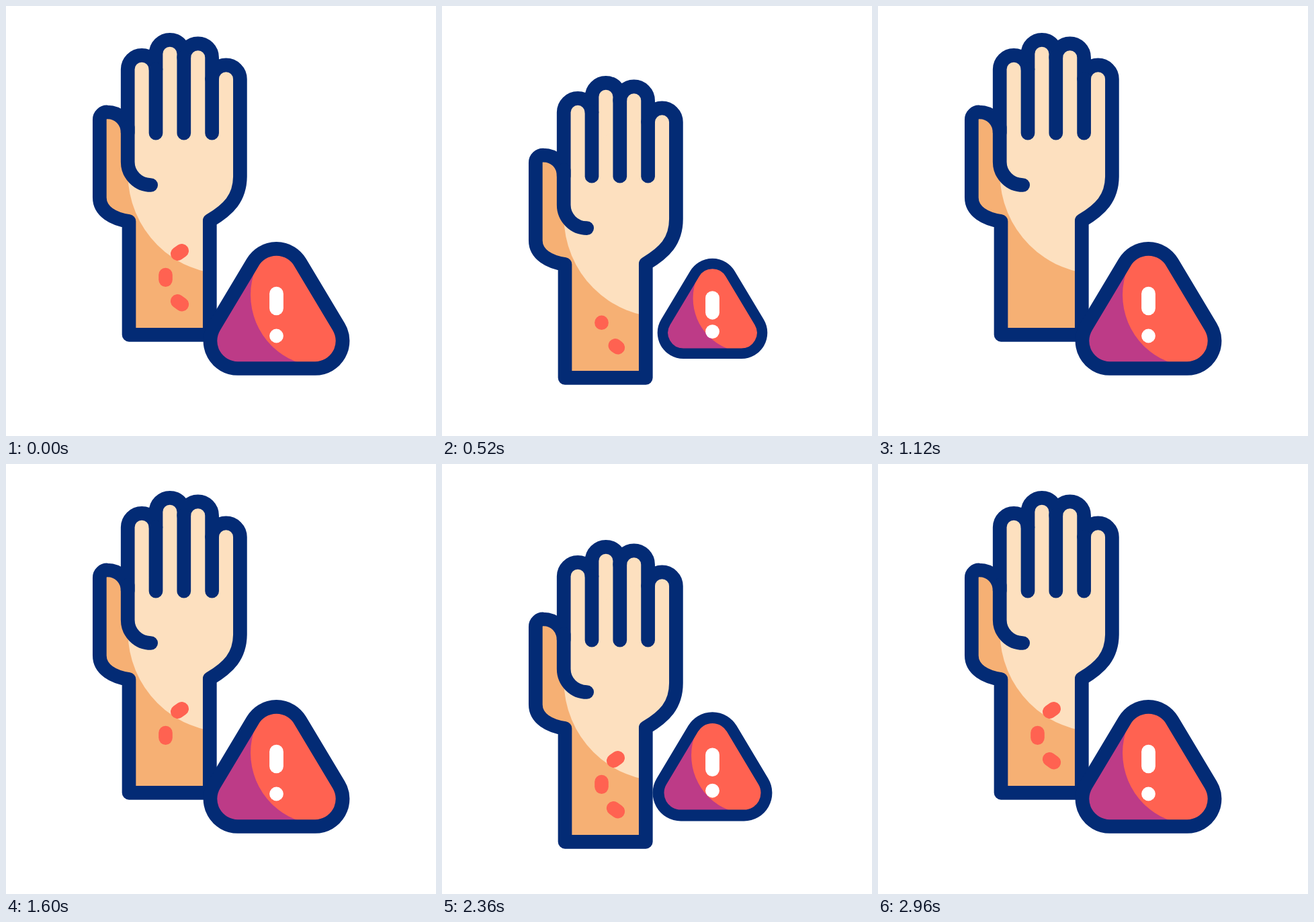
An HTML page for the animation above (3 s loop, 640 by 640 pixels).

```html
<!DOCTYPE html>
<html lang="en">
<head>
<meta charset="utf-8">
<title>Skin rash warning</title>
<style>
  html, body { margin: 0; width: 100%; height: 100%; overflow: hidden; background: #fff; }
  svg { display: block; width: 100vw; height: 100vh; }
  .outline { fill: none; stroke: #032b75; stroke-width: 20.7; stroke-linecap: round; stroke-linejoin: round; vector-effect: non-scaling-stroke; }
  .spot { stroke: #ff6251; stroke-width: 20.6; stroke-linecap: round; }
</style>
</head>
<body>
<svg viewBox="0 0 640 640">
  <defs>
    <path id="handShape" d="M183 489.3V320.5C160 317 139.3 306 139.3 285V169A11 11 0 0 1 151 158C168 158 181.2 171 181.2 189V94.3A20.9 20.9 0 0 1 223 94.3V71.2A20.9 20.9 0 0 1 264.8 71.2V76.7A20.9 20.9 0 0 1 306.6 76.7V108.8A20.9 20.9 0 0 1 348.4 108.8V253C348.4 286 331 303 303.3 319.5V489.3Z"/>
    <path id="signShape" d="M345 539.5H460A41 41 0 0 0 495.2 477.4L437.7 381.4A41 41 0 0 0 367.3 381.4L309.8 477.4A41 41 0 0 0 345 539.5Z"/>
    <clipPath id="handClip"><use href="#handShape"/></clipPath>
    <clipPath id="signClip"><use href="#signShape"/></clipPath>
  </defs>

  <g id="hand">
    <use href="#handShape" fill="#f6b074"/>
    <g clip-path="url(#handClip)" fill="#fde0bf">
      <rect x="181.2" y="30" width="180" height="220"/>
      <circle cx="331" cy="250" r="149.5"/>
    </g>
    <g id="spots"></g>
    <use href="#handShape" class="outline"/>
    <path class="outline" d="M223 94V189.2M264.8 76V189.2M306.6 108V189.2M181.2 180V232C181.2 251 196.5 266.5 215.7 266.5"/>
  </g>

  <g id="sign">
    <use href="#signShape" fill="#bd3b87"/>
    <g clip-path="url(#signClip)"><circle cx="471" cy="430" r="107" fill="#ff6251"/></g>
    <use href="#signShape" class="outline"/>
  </g>
  <path id="bar" d="M402.5 428.2V449.8" stroke="#fff" stroke-width="20.8" stroke-linecap="round"/>
  <circle id="point" cx="402.5" cy="491" r="10.4" fill="#fff"/>
</svg>
<script>
const LOOP = 3000, STEP = 40;
const DROP = 73, SHRINK = 0.25;
const $ = id => document.getElementById(id);
const mix = (a, b, k) => a + (b - a) * k;
const progress = (t, from, to) => Math.min(1, Math.max(0, (t - from) / (to - from)));
const smooth = x => x * x * (3 - 2 * x);

// cubic-bezier(1/3, 0, 5/6, 1)
function lateEase(x) {
  let u = x;
  for (let i = 0; i < 6; i++) u -= (u + u * u / 2 - u ** 3 / 2 - x) / (1 + u - 1.5 * u * u);
  return smooth(u);
}

// Rises from 0 to 1 and falls back to 0.
const pulse = (t, start, peak, end, rise, fall) =>
  rise(progress(t, start, peak)) - fall(progress(t, peak, end));

// Each spot is a short stroke, wiped out and later drawn again from its first end.
const spots = [
  { from: [255.3, 368.7], to: [261.7, 364.3], hide: 240, show: 1200 },
  { from: [237.5, 400], to: [237.5, 407.6], hide: 340, show: 1400 },
  { from: [255.2, 439.4], to: [261.8, 444.2], hide: 440, show: 1600 }
];
for (const spot of spots) {
  spot.el = document.createElementNS("http://www.w3.org/2000/svg", "line");
  spot.el.setAttribute("class", "spot");
  $("spots").append(spot.el);
}

function drawSpot({ el, from, to, hide, show }, t) {
  const start = t < show ? progress(t, hide, hide + 200) : 0;
  const end = t < show ? 1 : progress(t, show, show + 200);
  el.style.display = end > start ? "" : "none";
  el.setAttribute("x1", mix(from[0], to[0], start));
  el.setAttribute("y1", mix(from[1], to[1], start));
  el.setAttribute("x2", mix(from[0], to[0], end));
  el.setAttribute("y2", mix(from[1], to[1], end));
}

function draw(t) {
  const drop = DROP * (pulse(t, 0, 613, 1120, lateEase, lateEase)
                     + pulse(t, 1760, 2360, 2960, smooth, lateEase));
  const shrink = SHRINK * (pulse(t, 0, 500, 1000, smooth, smooth)
                         + pulse(t, 1625, 2130, 2810, smooth, smooth));
  $("hand").setAttribute("transform", `translate(0 ${drop})`);
  $("sign").setAttribute("transform",
    `translate(402.5 449.8) scale(${1 - shrink}) translate(-402.5 -449.8)`);
  $("bar").setAttribute("transform", `translate(0 ${26 * shrink})`);
  $("point").setAttribute("transform", `translate(0 ${-26 * shrink})`);
  spots.forEach(spot => drawSpot(spot, t));
}

const begin = performance.now();
function tick() {
  const t = (performance.now() - begin) % LOOP;
  draw(Math.floor(t / STEP) * STEP);
  requestAnimationFrame(tick);
}
tick();
</script>
</body>
</html>
```
